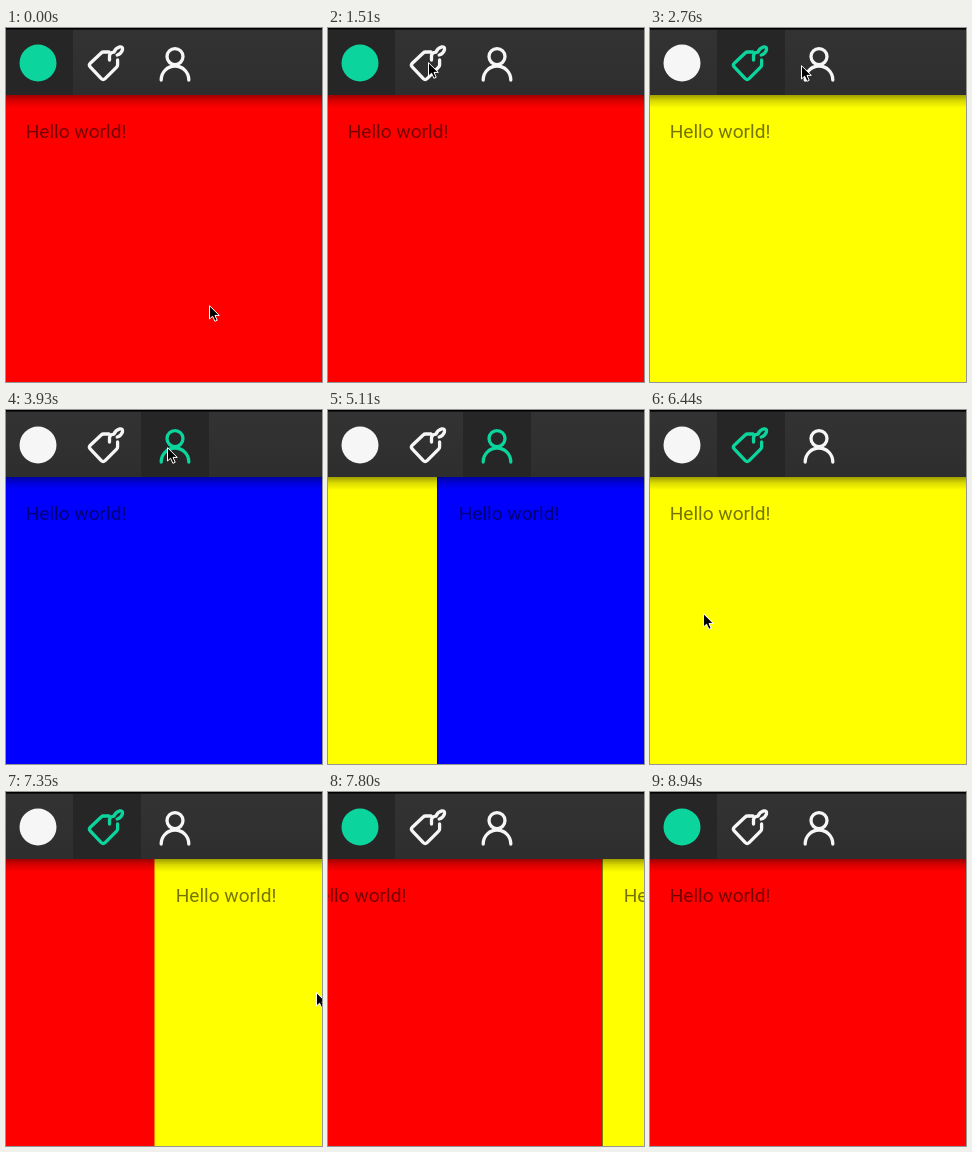
Animation of 316 by 354 pixels, one loop 9960 ms. Source, as an HTML page:

```html
<!DOCTYPE html>
<html lang="en">
<head>
<meta charset="utf-8">
<title>Swipeable tabs</title>
<style>
  html, body { margin: 0; width: 100%; height: 100%; overflow: hidden; background: #000; }
  svg { display: block; width: 316px; height: 354px; }
  text { font: 19.1px Roboto, sans-serif; fill: #000; fill-opacity: .54; }
  .icon { fill: none; stroke-width: 3.3; stroke-linecap: round; stroke-linejoin: round; }
</style>
</head>
<body>
<svg viewBox="0 0 316 354">
  <defs>
    <linearGradient id="bar" x2="0" y2="1">
      <stop stop-color="#333"/><stop offset="1" stop-color="#2e2e2e"/>
    </linearGradient>
    <linearGradient id="shade" x2="0" y2="1">
      <stop stop-opacity=".38"/><stop offset=".45" stop-opacity=".15"/><stop offset="1" stop-opacity="0"/>
    </linearGradient>
  </defs>
  <g id="pages"></g>
  <rect y="67" width="316" height="13" fill="url(#shade)"/>
  <rect width="316" height="67" fill="url(#bar)"/>
  <rect id="tab" y="2" height="65" fill="#262626"/>
  <rect width="316" height="1.6" fill="#000"/>
  <circle class="tint" cx="32" cy="35" r="18.5"/>
  <g class="tint icon">
    <path d="M103 24H97.5Q96.2 24 95.2 25L84.3 35.2Q82.5 37 84.2 38.8L95.3 50.6Q97.2 52.4 99.1 50.6L110.6 39.2Q111.6 38.2 111.6 36.8V32"/>
    <path d="M103.5 32V27.5Q104 24.5 108 24.2Q109.5 20 113.8 18.9Q117 18.6 116.5 21.8Q115.4 25.8 111.2 27"/>
  </g>
  <g class="tint icon">
    <circle cx="169" cy="28.6" r="8"/>
    <path d="M155.2 52V51.8A13.8 13.8 0 0 1 182.8 51.8V52"/>
  </g>
  <path id="cursor" d="M.5 .7V14L3.6 11.2L5.9 16.3L8.2 15.3L6 10.4H10.3Z" fill="#000" stroke="#fff"/>
</svg>
<script>
const LOOP = 9960;
const PITCH = 317.5;  // distance between pages
const TICK = 140;     // screen refresh, ms

const $ = s => document.querySelector(s);
const easeIn = k => k * k;
const easeOut = k => 1 - (1 - k) ** 2;
const smooth = k => k * k * (3 - 2 * k);

// Each move: start, end, easing, goal
const pointer = {
  origin: [203, 277],
  moves: [
    [430, 1360, smooth, [100, 34]],
    [2490, 3040, easeOut, [161, 37]],
    [4210, 4590, smooth, [75, 205]],
    [4720, 5110, easeIn, [330, 203]],
    [5680, 6440, smooth, [53, 203]],
    [6830, 7350, easeIn, [310, 200]],
    [7500, 7500, smooth, [340, 200]],
    [8820, 8820, smooth, [295, 338]],
    [8940, 8940, smooth, [295, 380]]
  ]
};
// Taps jump to a page; swipes are a drag and then a settle.
const pager = {
  origin: [0],
  moves: [
    [1940, 2210, easeOut, [1]],
    [3930, 3930, smooth, [2]],
    [4720, 5110, easeIn, [2 - 111 / PITCH]],
    [5230, 5830, easeOut, [1]],
    [6830, 7350, easeIn, [1 - 150 / PITCH]],
    [7500, 8260, easeOut, [0]]
  ]
};
// Time, selected tab
const picks = [[0, 0], [1940, 1], [3930, 2], [5380, 1], [7500, 0]];
const tabEdges = [0, 67, 135, 203];

// Moves advance in whole refreshes, the first of them at the start time.
function follow({ origin, moves }, t) {
  let at = origin;
  for (const [start, end, ease, goal] of moves) {
    if (t < start) break;
    const steps = Math.round((end - start) / TICK) + 1;
    const gap = (end - start) / (steps - 1) || 1;
    const done = Math.min(steps, Math.floor((t - start) / gap + 1.1));
    const k = ease(done / steps);
    at = at.map((v, i) => v + (goal[i] - v) * k);
  }
  return at;
}

$('#pages').innerHTML = ['#f00', '#ff0', '#00f'].map(color =>
  `<g><rect x="-1.5" y="67" width="${PITCH}" height="287" fill="${color}"/>
   <text x="19.7" y="110.3">Hello world!</text></g>`
).join('');
const pages = [...$('#pages').children];
const icons = [...document.querySelectorAll('.tint')];

function draw(t) {
  const tab = picks.filter(p => p[0] <= t).pop()[1];
  const pressed = t >= 3500 && t < 3930 ? 2 : tab;
  const [page] = follow(pager, t);
  const [x, y] = follow(pointer, t).map(Math.round);

  pages.forEach((el, i) =>
    el.setAttribute('transform', `translate(${Math.round((i - page) * PITCH)})`));
  icons.forEach((el, i) => {
    const color = i === tab || i === pressed ? '#0bd59c' : '#f6f6f6';
    el.setAttribute(i ? 'stroke' : 'fill', color);
  });
  $('#tab').setAttribute('x', tabEdges[tab]);
  $('#tab').setAttribute('width', tabEdges[tab + 1] - tabEdges[tab]);
  $('#cursor').setAttribute('transform', `translate(${x} ${y})`);
}

const start = performance.now();
function frame() {
  draw((performance.now() - start) % LOOP);
  requestAnimationFrame(frame);
}
frame();
</script>
</body>
</html>
```
